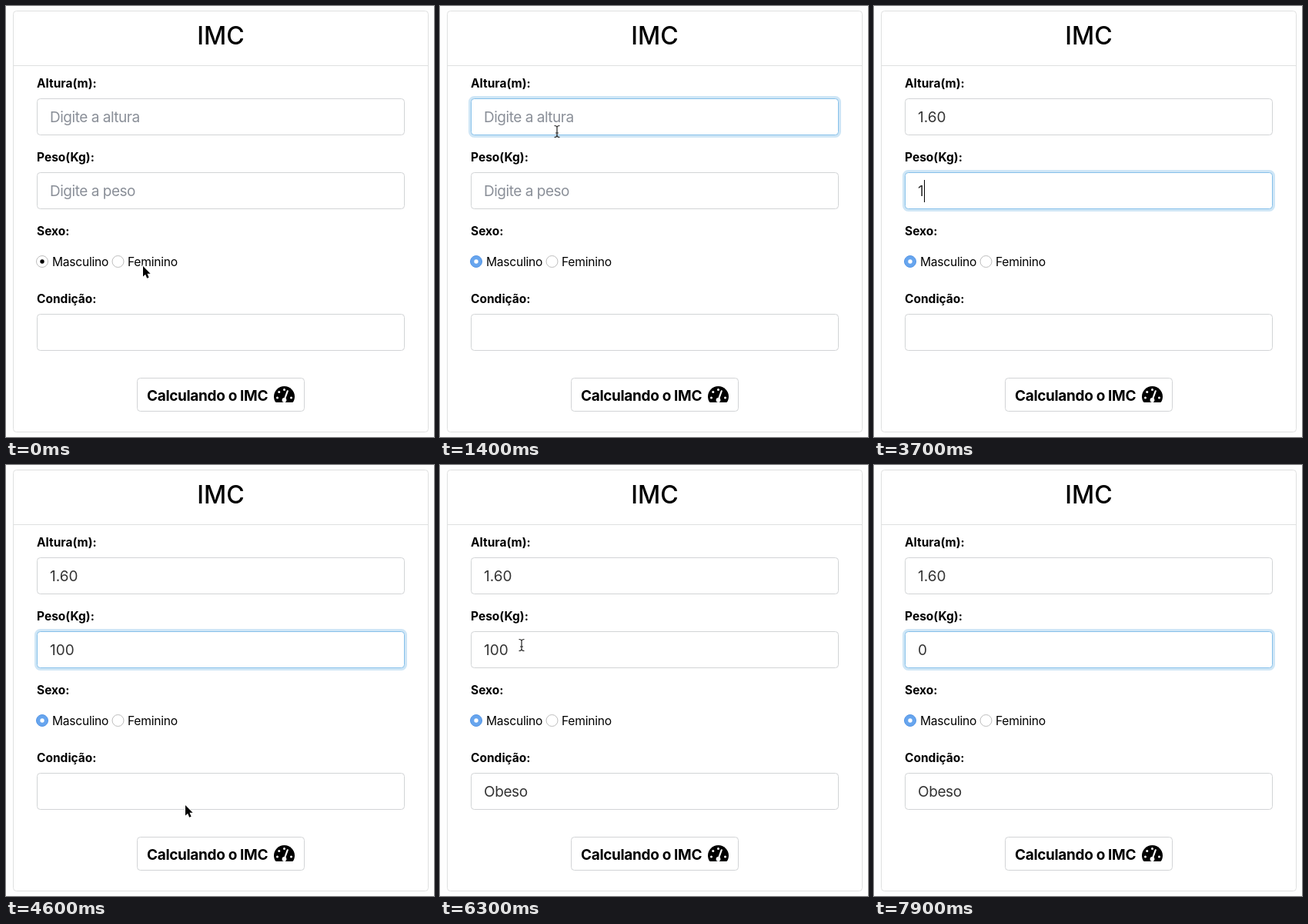
These frames come from a looping animation (556x560 px, 8000 ms). An HTML page:

```html
<!DOCTYPE html>
<html lang="pt">
<head>
<meta charset="utf-8">
<title>IMC</title>
<style>
html, body { margin: 0; width: 100%; height: 100%; overflow: hidden; background: #fefefe; }
svg { display: block; width: 556px; height: 560px; font-family: Inter, "Open Sans", sans-serif; }
.label { font-weight: 700; font-size: 15.5px; }
.option { font-size: 15.6px; letter-spacing: -.015em; }
.value { font-size: 19px; fill: #333; }
.hint { fill: #8a8f98; letter-spacing: -.025em; }
.word { letter-spacing: -.02em; }
.box { fill: #fff; stroke: #d2d4d6; }
</style>
</head>
<body>
<svg viewBox="0 0 556 560">
  <rect class="box" x="9.5" y="6.5" width="539" height="547" rx="4" style="stroke:#dfe0e0"/>
  <path d="M10 77.5H548" stroke="#dfe0e0"/>
  <text x="279" y="50" font-size="32" font-weight="500" text-anchor="middle">IMC</text>

  <text class="label" x="40" y="106">Altura(m):</text>
  <text class="label" x="40" y="202">Peso(Kg):</text>
  <text class="label" x="40" y="298">Sexo:</text>
  <text class="label" x="40" y="386">Condição:</text>
  <g id="fields"></g>

  <circle id="radio" cx="47" cy="332" r="7.5"/>
  <circle id="dot" cx="47" cy="332" r="2.7"/>
  <text class="option" x="60" y="338">Masculino</text>
  <circle cx="145.5" cy="332" r="7.5" fill="#fff" stroke="#bdbdbd"/>
  <text class="option" x="158" y="338">Feminino</text>

  <rect class="box" x="170.5" y="483.5" width="217" height="43" rx="4"/>
  <text x="183" y="513" font-size="19" font-weight="700" letter-spacing="-.34">Calculando o IMC</text>
  <g transform="translate(348 492.5) scale(.0469)" fill="#fff">
    <path fill="#000" d="M288 32C129 32 0 161 0 320c0 53 14 102 39 145 6 9 16 15 28 15h442c12 0 22-6 28-15 25-43 39-92 39-145C576 161 447 32 288 32z"/>
    <circle cx="288" cy="128" r="32"/><circle cx="144" cy="192" r="32"/>
    <circle cx="96" cy="352" r="32"/><circle cx="480" cy="352" r="32"/>
    <path d="M288 416L378 168" stroke="#fff" stroke-width="46" stroke-linecap="round"/>
    <circle cx="288" cy="416" r="62"/>
  </g>

  <path id="caret" stroke="#000" d="M.5 0V29"/>
  <g id="pointer">
    <path id="arrow" d="M0 0V13.5L3.1 10.7 5.2 15.7 7.6 14.7 5.5 9.8H9.6Z" stroke="#fff" stroke-width="1.6" paint-order="stroke"/>
    <path id="beam" d="M-3.5-7.5Q0-7.5 0-5V5Q0 7.5-3.5 7.5M3.5-7.5Q0-7.5 0-5V5Q0 7.5 3.5 7.5M-2 2H2" fill="none" stroke="#222" stroke-width="1.2"/>
  </g>
</svg>
<script>
const LOOP = 8000, STEP = 100, FADE = 150, BLINK = 400;
const $ = id => document.getElementById(id);
const clamp = v => Math.max(0, Math.min(1, v));

// Each field: top, hint, focus spans, and [time, text, text before caret]
const fields = [
  { y: 120, hint: "Digite a altura", focus: [[1000, 2900]],
    edits: [[0, ""], [2000, "1"], [2200, "1."], [2400, "1.6"], [2600, "1.60"]] },
  { y: 216, hint: "Digite a peso", focus: [[2980, 5230], [6600, 9000]],
    edits: [[0, ""], [3700, "1"], [3900, "10"], [4100, "100"],
            [6600, "100", "10"], [7300, "10", "1"], [7500, "0", ""]] },
  { y: 400, hint: "", focus: [], edits: [[0, ""], [5200, "Obeso"]] }
];
// Pointer stops: time, x, y
const stops = [[0, 178, 338], [300, 178, 338], [900, 160, 215], [1100, 152, 163], [4100, 152, 163],
               [4600, 233, 442], [5000, 253, 495], [5500, 253, 495], [6300, 106, 234], [6600, 82, 238]];
const hidden = [[2000, 4150], [7200, 8000]];

function add(tag, attrs) {
  const el = document.createElementNS("http://www.w3.org/2000/svg", tag);
  for (const k in attrs) el.setAttribute(k, attrs[k]);
  return $("fields").appendChild(el);
}
for (const f of fields) {
  const frame = { x: 40.5, y: f.y + .5, width: 477, height: 47, rx: 4 };
  f.glow = add("rect", { ...frame, fill: "none", stroke: "#cfe6f6" });
  f.box = add("rect", { ...frame, class: "box" });
  f.text = add("text", { x: 57, y: f.y + 31 });
}

const within = (spans, t) => spans.find(([a, b]) => t >= a && t < b);
const mix = (a, b, k) => `rgb(${a.map((v, i) => Math.round(v + (b[i] - v) * k))})`;

function setText(el, str, cls) {
  el.textContent = str;
  el.setAttribute("class", cls);
}

function drawField(f, t) {
  const level = f.focus.reduce((s, [a, b]) => s + clamp((t - a) / FADE) - clamp((t - b) / FADE), 0);
  f.glow.setAttribute("stroke-width", 1 + 6 * level);
  f.glow.style.opacity = level > 0 ? 1 : 0;
  f.box.style.stroke = mix([210, 212, 214], [134, 192, 234], clamp(level * 2));

  const [time, str, before = str] = f.edits.findLast(e => e[0] <= t);
  const span = within(f.focus, t);
  if (span && (t - Math.max(time, span[0])) % (2 * BLINK) < BLINK) {
    setText(f.text, before, "value");
    const x = 57 + (before ? Math.round(f.text.getComputedTextLength()) : 0);
    $("caret").setAttribute("transform", `translate(${x} ${f.y + 10})`);
    $("caret").style.display = "";
  }
  setText(f.text, str || f.hint, "value " + (str ? /\d/.test(str) ? "" : "word" : "hint"));
}

function drawPointer(t) {
  const i = stops.findLastIndex(s => s[0] <= t);
  const a = stops[i], b = stops[i + 1] || a;
  const k = clamp((t - a[0]) / (b[0] - a[0] || 1)), ease = k * k * (3 - 2 * k);
  const x = a[1] + (b[1] - a[1]) * ease, y = a[2] + (b[2] - a[2]) * ease;
  const typing = fields.slice(0, 2).some(f => y > f.y && y < f.y + 48);
  $("pointer").setAttribute("transform", `translate(${x} ${y})`);
  $("pointer").style.display = within(hidden, t) ? "none" : "";
  $("arrow").style.display = typing ? "none" : "";
  $("beam").style.display = typing ? "" : "none";
}

function draw(now) {
  const t = Math.floor(now % LOOP / STEP) * STEP;
  const active = t >= 300;
  $("radio").setAttribute("fill", active ? "#67a5ee" : "#fff");
  $("radio").setAttribute("stroke", active ? "#5596e6" : "#bdbdbd");
  $("dot").setAttribute("fill", active ? "#fff" : "#000");
  $("caret").style.display = "none";
  for (const f of fields) drawField(f, t);
  drawPointer(t);
}

const start = performance.now();
function tick() {
  draw(performance.now() - start);
  requestAnimationFrame(tick);
}
tick();
</script>
</body>
</html>
```
